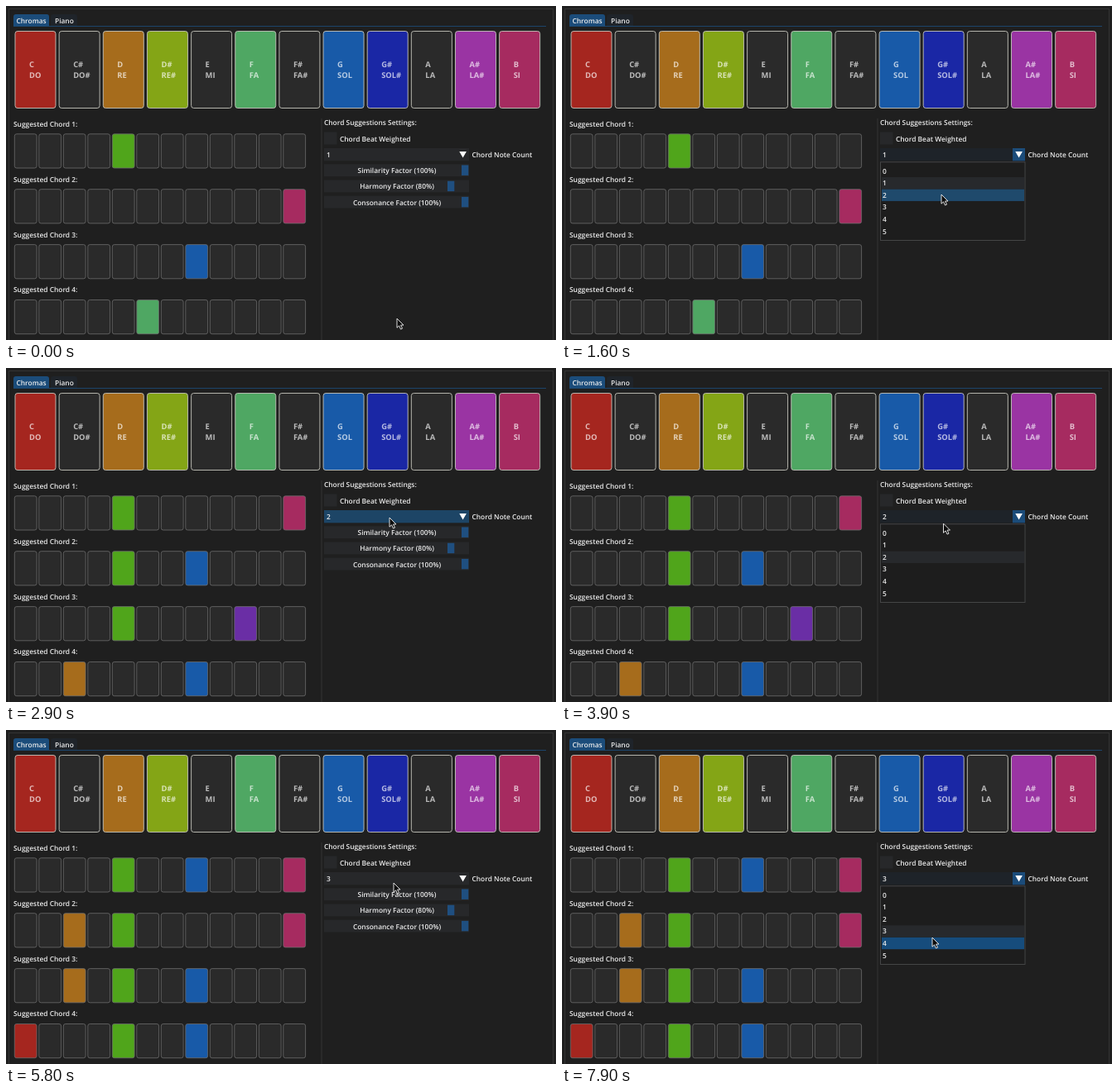
These frames come from a looping animation (664 by 404 pixels, 8 s). An HTML page:

```html
<!DOCTYPE html>
<html lang="en">
<head>
<meta charset="utf-8">
<title>Chord suggestions</title>
<style>
  html, body { margin: 0; width: 664px; height: 404px; overflow: hidden; background: #1f1f1f; }
  svg { display: block; }
  text { font: 600 8.4px "Open Sans", sans-serif; fill: #ececec; text-rendering: geometricPrecision; white-space: pre; }
  .pad { font-size: 9.4px; font-weight: 700; fill: #fff; fill-opacity: .68; }
  .mid { text-anchor: middle; }
</style>
</head>
<body>
<svg id="stage" width="664" height="404" viewBox="0 0 664 404"></svg>
<script>
const LOOP = 8000, STEP = 100;
const stage = document.getElementById('stage');

const NOTES = ['C DO', 'C# DO#', 'D RE', 'D# RE#', 'E MI', 'F FA', 'F# FA#', 'G SOL', 'G# SOL#', 'A LA', 'A# LA#', 'B SI'];
const DARK = '#2a2a2a', FRAME = '#27282a', HOVER = '#1d4566', BLUE = '#1b4c7a';
const HUES = { 0: '#a5261f', 2: '#a66c1c', 3: '#84a516', 4: '#50a51b', 5: '#4fa763', 7: '#185aa8',
               8: '#1a27a5', 9: '#6a2ea5', 10: '#9a34a3', 11: '#a62b60' };
const PLAIN_PADS = [4, 9];
const CHORDS = {
  1: [[4], [11], [7], [5]],
  2: [[4, 11], [4, 7], [4, 9], [2, 7]],
  3: [[4, 7, 11], [2, 4, 11], [2, 4, 7], [0, 4, 7]]
};

// time, x, y of the pointer
const PATH = [
  [0, 472, 378], [900, 469, 182], [1100, 469, 182], [1600, 458, 228], [1900, 459, 230],
  [2000, 459, 230], [2900, 463, 181], [3700, 463, 181], [4600, 443, 237], [4800, 443, 237],
  [5800, 468, 185], [6000, 468, 182], [6800, 468, 182], [7400, 446, 250], [7500, 447, 251], [8000, 447, 251]
];
const OPEN = [[1000, 2100], [3300, 4900], [6600, LOOP]];
const PICKS = [[4900, 3], [2100, 2], [0, 1]];
const PRESS = 7800;

function add(tag, attrs, parent = stage) {
  const node = document.createElementNS('http://www.w3.org/2000/svg', tag);
  for (const key in attrs) node.setAttribute(key, attrs[key]);
  return parent.appendChild(node);
}
const box = (x, y, width, height, fill, more = {}, parent) =>
  add('rect', { x, y, width, height, fill, ...more }, parent);
function label(x, y, str, cls = '', parent) {
  const node = add('text', { x, y, class: cls }, parent);
  node.textContent = str;
  return node;
}

// window and tabs
box(3.5, 3.5, 657, 420, 'none', { stroke: '#343434' });
box(9, 24, 643, 1, '#1c456b');
add('path', { d: 'M9 24.5V13q0-3 3-3h37q3 0 3 3v11.5z', fill: BLUE });
add('path', { d: 'M54 24V13q0-3 3-3h26q3 0 3 3v11z', fill: '#1f242a' });
label(12.5, 20.5, 'Chromas');
label(59, 20.5, 'Piano');
box(380.5, 136, 1, 268, '#353535');

NOTES.forEach((note, i) => {
  const x = 11 + 53.15 * i;
  const fill = PLAIN_PADS.includes(i) ? DARK : HUES[i] || DARK;
  box(x, 30.5, 49, 93, fill, { rx: 3, stroke: '#c4c4bc', 'stroke-width': .9 });
  note.split(' ').forEach((name, row) => label(x + 17, 73.5 + 13 * row, name, 'pad'));
});

const cells = [0, 1, 2, 3].map(row => {
  label(9, 146 + 66.8 * row, `Suggested Chord ${row + 1}:`);
  return NOTES.map((_, i) =>
    box(10.3 + 29.5 * i, 154.8 + 66.9 * row, 26.8, 41.2, DARK, { rx: 2.5, stroke: '#6c6c6c', 'stroke-width': .8 }));
});

// settings
label(384, 144.3, 'Chord Suggestions Settings:');
box(384, 152.5, 15.5, 15, FRAME);
label(403, 163.5, 'Chord Beat Weighted');
const combo = box(384, 172, 175, 15.3, FRAME);
const button = box(544, 172, 15, 15.3, BLUE);
add('path', { d: 'M547.3 176h8.6l-4.3 7.6z', fill: '#fff' });
const value = label(387, 183, '1');
label(562.5, 183, 'Chord Note Count');

const sliders = [['Similarity Factor (100%)', 550], ['Harmony Factor (80%)', 533], ['Consonance Factor (100%)', 550]]
  .map(([name, grab], i) => {
    const y = 191.3 + 19.2 * i;
    const frame = box(384, y, 175, 14.8, FRAME);
    box(grab, y + 1.2, 8.3, 12.4, '#1f4f80');
    label(472, y + 10.8, name, 'mid');
    return { y, frame };
  });

const popup = add('g', {});
box(384.5, 188.8, 174.5, 94.7, '#1d1d1d', { stroke: '#48494b', 'stroke-width': .9 }, popup);
const rowTop = i => 192.4 + 14.62 * i;
const rows = [0, 1, 2, 3, 4, 5].map(i => {
  const bar = box(386, rowTop(i), 172, 14.3, 'none', {}, popup);
  label(387, rowTop(i) + 10.1, i, '', popup);
  return bar;
});

const pointer = add('path', {
  d: 'M0 0V11.2L2.6 8.8L4.5 13L6.5 12.1L4.6 8H8z',
  fill: '#0c0c0c', stroke: '#f2f2f2', 'stroke-width': .9, 'stroke-linejoin': 'round'
});

function pointerAt(t) {
  const i = PATH.findIndex((p, k) => k && t <= p[0]);
  const [t0, x0, y0] = PATH[i - 1], [t1, x1, y1] = PATH[i];
  const u = (t - t0) / (t1 - t0), e = u * u * (3 - 2 * u);
  return [x0 + (x1 - x0) * e, y0 + (y1 - y0) * e];
}

function draw(t) {
  const [x, y] = pointerAt(t);
  const count = PICKS.find(p => t >= p[0])[1];
  const open = OPEN.some(([from, to]) => t >= from && t < to);
  const over = (top, height) => !open && y >= top && y < top + height;

  pointer.setAttribute('transform', `translate(${x.toFixed(1)} ${y.toFixed(1)})`);
  value.textContent = count;
  popup.style.display = open ? '' : 'none';
  combo.setAttribute('fill', open ? '#1e2329' : over(172, 12.8) ? HOVER : FRAME);
  button.style.display = open ? '' : 'none';
  sliders.forEach(s => s.frame.setAttribute('fill', over(s.y, 14.8) ? HOVER : FRAME));
  rows.forEach((bar, i) => {
    const hot = y >= rowTop(i) - .2 && y < rowTop(i + 1) - .2;
    bar.setAttribute('fill', hot ? (t >= PRESS ? '#164c7c' : '#1f4a6c') : i === count ? '#27292c' : 'none');
  });
  cells.forEach((row, r) => row.forEach((cell, i) =>
    cell.setAttribute('fill', CHORDS[count][r].includes(i) ? HUES[i] : DARK)));
}

const start = performance.now();
function tick() {
  const t = (performance.now() - start) % LOOP;
  draw(Math.floor(t / STEP) * STEP);
  requestAnimationFrame(tick);
}
tick();
</script>
</body>
</html>
```
